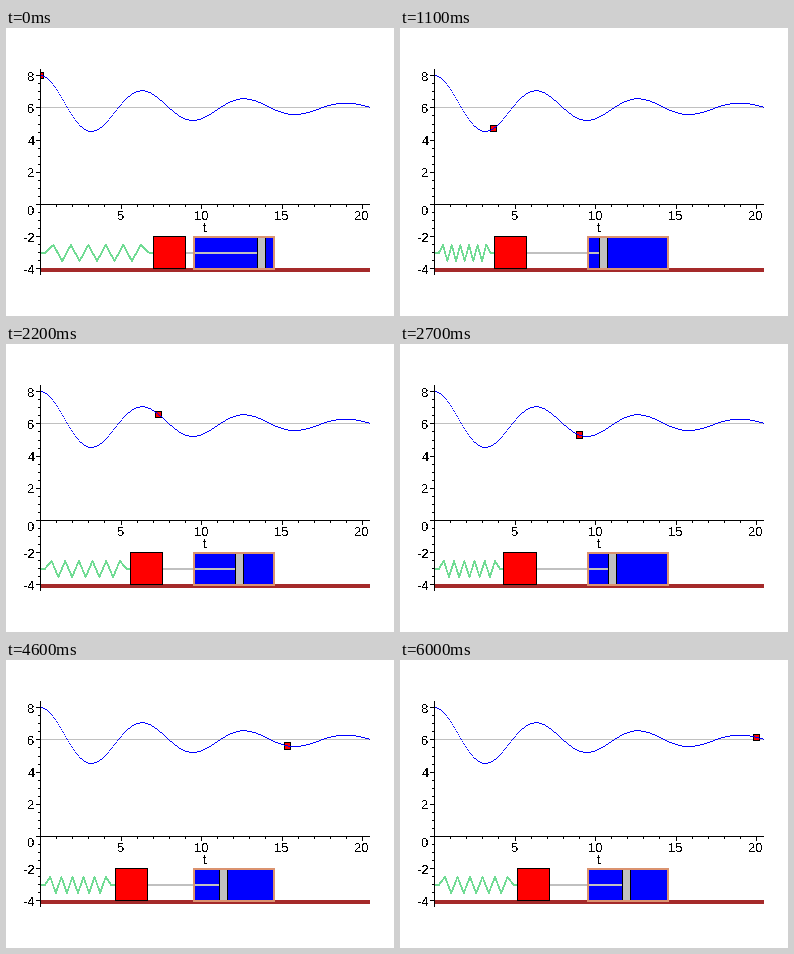
A matplotlib script for the animation above (6100 ms loop, 388 px wide and 288 px high).

```python
import matplotlib.pyplot as plt
import numpy as np
from matplotlib.animation import FuncAnimation
from matplotlib.patches import PathPatch, Rectangle
from matplotlib.path import Path

W, H, DPI = 388, 288, 100
FRAMES = 61
PX = 72 / DPI
UNIT = 16.1
GREY = "#c0c0c0"
SPRING = "#70db93"
TAN = "#db9370"
BROWN = "#a52a2a"

plt.rcParams["font.family"] = "Liberation Sans"
plt.rcParams["text.antialiased"] = False

fig = plt.figure(figsize=(W / DPI, H / DPI), dpi=DPI, facecolor="white")
ax = fig.add_axes([0, 0, 1, 1])
ax.set_xlim(0, W)
ax.set_ylim(H, 0)
ax.axis("off")


def sx(x):
    return 34 + UNIT * np.asarray(x)


def sy(y):
    return 176 - UNIT * np.asarray(y)


def position(t):
    """Damped oscillator released at rest from 8, settling at 6."""
    w = np.sqrt(0.99)
    return 6 + 2 * np.exp(-0.1 * t) * (np.cos(w * t) + 0.1 / w * np.sin(w * t))


def line(x, y, color, width=1, z=1, **kw):
    return ax.plot(x, y, color=color, lw=width * PX, zorder=z,
                   antialiased=False, solid_capstyle="butt", **kw)[0]


def box(x0, y0, x1, y1, face, edge, z, width=1):
    # Even line widths snap between pixels, so they sit one pixel further.
    shift = 1 if width % 2 == 0 else 0
    patch = Rectangle((sx(x0) + shift, sy(y1) + shift),
                      UNIT * (x1 - x0), UNIT * (y1 - y0),
                      fc=face, ec=edge, lw=width * PX, zorder=z,
                      antialiased=False)
    return ax.add_patch(patch)


def pixel_curve(x, y, color, z):
    """Draw a crisp curve, one pixel thick, as a run of unit squares."""
    square = np.array([[0, 0], [1, 0], [1, 1], [0, 1], [0, 0]]) * 0.9 + 0.05
    cells = np.unique(np.column_stack([x, np.rint(y)]), axis=0)
    verts = (cells[:, None, :] + square).reshape(-1, 2)
    codes = [Path.MOVETO] + [Path.LINETO] * 3 + [Path.CLOSEPOLY]
    path = Path(verts, codes * len(cells))
    ax.add_patch(PathPatch(path, fc=color, ec="none", zorder=z,
                           antialiased=False, snap=False))


def label(x, y, text, align="center"):
    ax.text(x, y, text, fontsize=13 * PX, ha=align, va="baseline", zorder=9)


def draw_axes():
    line([34, 34], [41, 246], "black", z=8)
    line([34, 363], [176, 176], "black", z=8)
    for n in range(1, 21):
        size = 4 if n % 5 == 0 else 2
        line([sx(n)] * 2, [177, 176 + size], "black", z=8)
        if n % 5 == 0:
            label(sx(n), 192, str(n))
    for n in np.arange(-4, 8.1, 0.5):
        major = n % 2 == 0
        line([30 if major else 32, 33], [sy(n)] * 2, "black", z=8)
        if major:
            base = 187 if n == 0 else sy(n) + 5.5
            label(29, base, f"{n:.0f}", "right")
    label(198.5, 204, "t")


draw_axes()
line([35, 363], [sy(6)] * 2, GREY)
columns = np.arange(34, 364)
pixel_curve(columns, sy(position((columns - 34) / UNIT)), "blue", 4)
line([34, 364], [242, 242], BROWN, 4, z=2)

box(9.5, -4, 14.5, -2, "blue", "none", 3)
box(9.5, -4, 14.5, -2, "none", TAN, 6, 2)
rod = line([0, 0], [sy(-3) + 1] * 2, GREY, 2, z=4)
piston = box(0, -4, 0.5, -2, GREY, "black", 5)
mass = box(0, -4, 2, -2, "red", "black", 5)
spring_y = sy([-3, -3] + [-2.5, -3.5] * 5 + [-2.5, -3, -3]) + 0.7
spring = line([], [], SPRING, 0.5, z=3, snap=False)
marker = box(-0.2, -0.2, 0.2, 0.2, "red", "black", 3)
marker.set_clip_path(Rectangle((34, 0), W, H, transform=ax.transData))


def spring_x(end):
    """Straight leads at both ends with the coils between them."""
    half = (end - 0.5) / 12
    peaks = 0.25 + half * np.arange(1, 12)
    return np.concatenate([[0, 0.25], peaks, [end - 0.25, end]])


def update(i):
    t = i / 3
    x = position(t)
    mass.set_x(sx(x - 1))
    piston.set_x(sx(x + 5.5))
    rod.set_xdata(sx([x + 1, x + 5.5]))
    spring.set_data(sx(spring_x(x - 1)) + 0.7, spring_y)
    marker.set_xy((sx(t - 0.2), sy(x + 0.2)))
    return mass, piston, rod, spring, marker


anim = FuncAnimation(fig, update, frames=FRAMES, interval=100,
                     repeat=True, repeat_delay=0, blit=False)
plt.show()
```
